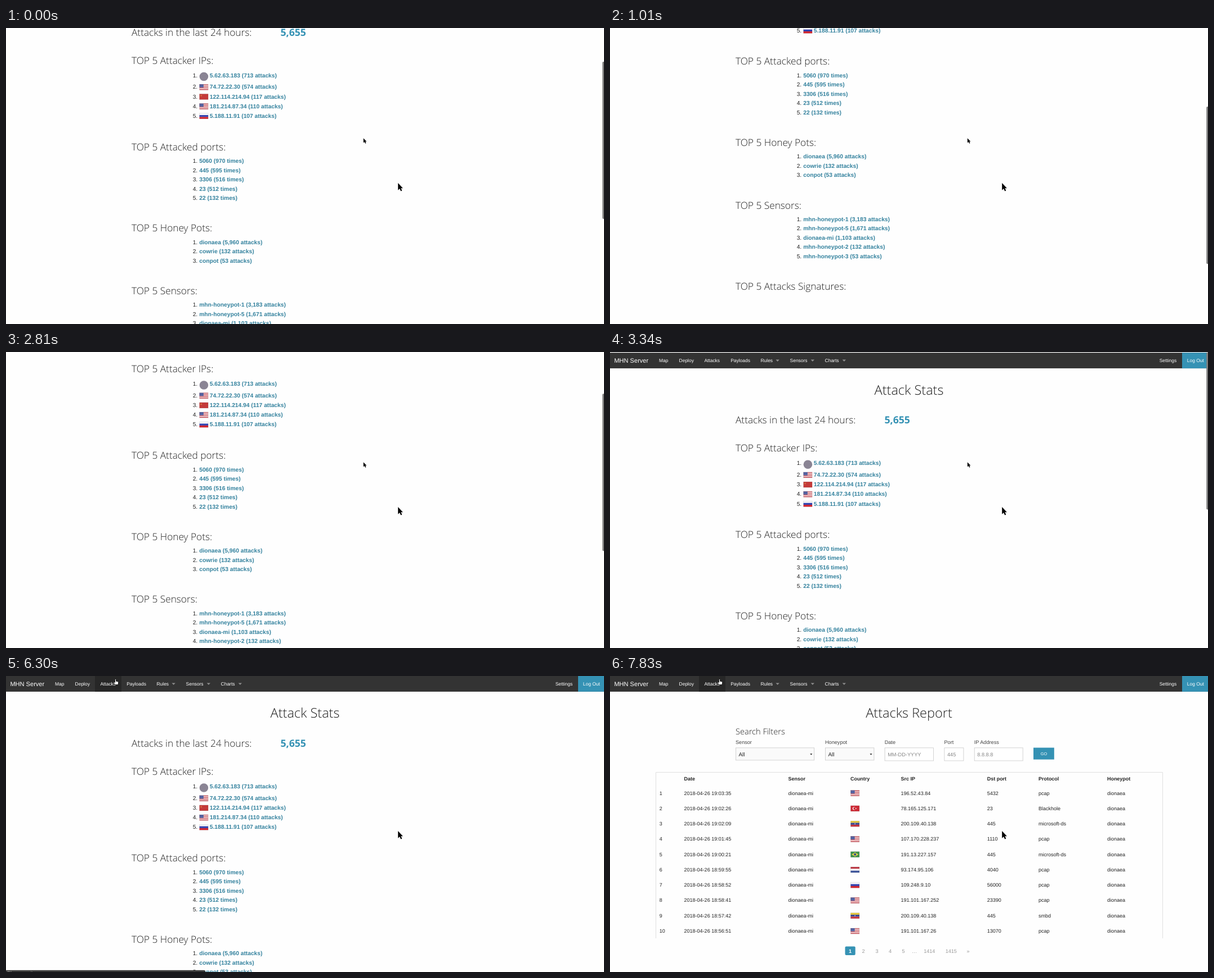
Write an HTML page that moves like this. It is 1062 by 527 pixels and loops after 8 s.

```html
<!DOCTYPE html>
<html lang="en">
<head>
<meta charset="utf-8">
<title>Attack stats</title>
<style>
html, body { margin: 0; width: 100%; height: 100%; overflow: hidden; background: #fefefe; }
svg { display: block; width: 100%; height: 100%; }
text { font-family: "Liberation Sans", Arial, sans-serif; text-rendering: geometricPrecision; white-space: pre; }
.head { font-family: "Open Sans", sans-serif; font-weight: 300; }
.total { font-family: "Open Sans", sans-serif; font-weight: 700; }
</style>
</head>
<body>
<svg id="stage" viewBox="0 0 1062 527" xmlns="http://www.w3.org/2000/svg"></svg>
<script>
const LOOP = 8000;
const BLUE = '#3592b4', LINK = '#34829e', INK = '#222';
const TITLE = 23.5, SECTION = 17.25, SUBHEAD = 14.6;

// Runs of picture changes: first time, last time, count
const RUNS = [
  [0, 0, 1], [150, 1190, 7], [1360, 1510, 2], [1840, 1980, 2], [2340, 2490, 2],
  [2660, 3340, 5], [3550, 4570, 6], [4750, 5380, 4], [5650, 6500, 5], [6770, 7660, 5], [7830, 7830, 1]
];
const STEPS = RUNS.flatMap(([a, b, n]) =>
  Array.from({ length: n }, (_, i) => n > 1 ? Math.floor((a + (b - a) * i / (n - 1)) / 10) * 10 : a));
const SCROLL_UP = [[2340, 283], [2490, 240], [2660, 140], [2830, 35], [3000, -12], [3170, -4], [3340, -1.2], [3550, 0]];

// Markup helpers
const text = (x, y, str, size, fill = INK, extra = '') =>
  `<text x="${x}" y="${y}" font-size="${size}" fill="${fill}" ${extra}>${str}</text>`;
const rect = (x, y, w, h, fill, extra = '') =>
  `<rect x="${x}" y="${y}" width="${w}" height="${h}" fill="${fill}" ${extra}/>`;
const group = (id, body, extra = '') => `<g id="${id}" ${extra}>${body}</g>`;
const BOLD = 'font-weight="700"', MID = 'text-anchor="middle"';
const heading = (x, y, str, size, extra = '') => text(x, y, str, size, INK, 'class="head" ' + extra);
const disc = (cx, cy, r, fill) => `<circle cx="${cx}" cy="${cy}" r="${r}" fill="${fill}"/>`;

// Flags, 15.5 by 10
const bands = colors => colors.map((c, i) =>
  rect(0, i * 10 / colors.length, 15.5, 10 / colors.length + 0.05, c)).join('');
const FLAGS = {
  us: bands(['#c8474f', '#f3e6e8', '#c8474f', '#f3e6e8', '#c8474f', '#f3e6e8', '#c8474f']) + rect(0, 0, 7.2, 5.6, '#5462a0'),
  cn: rect(0, 0, 15.5, 10, '#c43a3a') + disc(3, 3, 1.2, '#d9843f'),
  ru: bands(['#f6f6f8', '#3142b0', '#d0242e']),
  tr: rect(0, 0, 15.5, 10, '#cd2a35') + disc(6, 5, 2.6, '#fff') + disc(6.8, 5, 2.1, '#cd2a35') + disc(9.4, 5, 0.9, '#fff'),
  ve: bands(['#e3c53c', '#34458f', '#c4333d']) + disc(7.7, 5, 0.9, '#c9cfe4'),
  br: rect(0, 0, 15.5, 10, '#3b8f4b') + '<path d="M1.6 5 7.75 1.2 13.9 5 7.75 8.8Z" fill="#dfcf45"/>' + disc(7.75, 5, 2.1, '#35508f'),
  nl: bands(['#bd3a45', '#f5f5f7', '#3d559b'])
};
const flag = (code, x, cy) => `<g transform="translate(${x} ${cy - 5})">${FLAGS[code]}` +
  '<rect width="15.5" height="10" fill="none" stroke="#000" stroke-opacity=".15" stroke-width=".6"/></g>';

function navBar() {
  const item = (x, str) => text(x, 16.8, str, 8.45, '#fff');
  const arrow = x => `<path d="M${x - 3.2} 12.4h6.4l-3.2 3.4z" fill="#8f8f8f"/>`;
  return rect(0, 0, 1062, 27.9, '#333') +
    rect(158, 0, 47, 27.9, '#272727', 'id="hover"') +
    rect(1016, 0, 46, 27.9, BLUE) +
    text(7.4, 17.8, 'MHN Server', 11.05, '#fff') +
    [[87, 'Map'], [122.6, 'Deploy'], [167.4, 'Attacks'], [214.2, 'Payloads'], [267.5, 'Rules'],
     [319.6, 'Sensors'], [381.6, 'Charts'], [975.7, 'Settings'], [1024.8, 'Log Out']].map(a => item(...a)).join('') +
    [297.6, 359.8, 415.8].map(arrow).join('');
}

function numbered(y, lines) {
  return lines.map((str, i) => {
    const row = y + i * 16.5;
    return text(331.7, row, `${i + 1}.`, 10.2) + text(343.2, row, str, 10.25, LINK, BOLD);
  }).join('');
}

function statsPage() {
  const ips = [['', '5.62.63.183 (713'], ['us', '74.72.22.30 (574'], ['cn', '122.114.214.94 (117'],
    ['us', '181.214.87.34 (110'], ['ru', '5.188.11.91 (107']];
  const ipRows = ips.map(([code, str], i) => {
    const y = i ? 203.8 + i * 17.15 : 200.2;
    return text(331.7, y, `${i + 1}.`, 10.2) +
      (code ? flag(code, 343.6, y - 3.2) : disc(351.4, 199, 7.8, '#8a8494')) +
      text(361.8, y, str + ' attacks)', 10.25, LINK, BOLD);
  }).join('');
  return heading(531, 74.4, 'Attack Stats', TITLE, MID) +
    heading(223, 126, 'Attacks in the last 24 hours:', SECTION) +
    text(487.5, 126, '5,655', 17.6, BLUE, 'class="total"') +
    [[176, 'Attacker IPs'], [330.3, 'Attacked ports'], [474.9, 'Honey Pots'], [586.4, 'Sensors'], [731.2, 'Attacks Signatures']]
      .map(([y, str]) => heading(223, y, `TOP 5 ${str}:`, SECTION)).join('') +
    ipRows +
    numbered(352.6, ['5060 (970', '445 (595', '3306 (516', '23 (512', '22 (132'].map(s => s + ' times)')) +
    numbered(497.1, ['dionaea (5,960', 'cowrie (132', 'conpot (53'].map(s => s + ' attacks)')) +
    numbered(608.6, ['mhn-honeypot-1 (3,183', 'mhn-honeypot-5 (1,671', 'dionaea-mi (1,103',
      'mhn-honeypot-2 (132', 'mhn-honeypot-3 (53'].map(s => s + ' attacks)'));
}

function reportPage() {
  const field = (x, w, label, value, select) =>
    text(x, 121.4, label, 9.15, '#444') +
    rect(x + 0.4, 127.9, w, select ? 22 : 23, select ? '#fafafa' : '#fff', 'stroke="#c8c8c8" stroke-width=".8"') +
    text(x + 5.5, select ? 142.6 : 143, value, select ? 9.8 : 9.2, select ? INK : '#858585') +
    (select ? `<path d="M${x + w - 7} 138.2h4l-2 2.6z" fill="#222"/>` : '');
  const cols = [87.8, 131.6, 316.6, 427, 516.6, 669.8, 761, 883];
  const heads = ['', 'Date', 'Sensor', 'Country', 'Src IP', 'Dst port', 'Protocol', 'Honeypot'];
  const rows = `19:03:35 us 196.52.43.84 5432 pcap
19:02:26 tr 78.165.125.171 23 Blackhole
19:02:09 ve 200.109.40.138 445 microsoft-ds
19:01:45 us 107.170.228.237 1110 pcap
19:00:21 br 191.13.227.157 445 microsoft-ds
18:59:55 nl 93.174.95.106 4040 pcap
18:58:52 ru 109.248.9.10 56000 pcap
18:58:41 us 191.101.167.252 23390 pcap
18:57:42 ve 200.109.40.138 445 smbd
18:56:51 us 191.101.167.26 13070 pcap`.split('\n').map((line, i) => {
    const [time, code, ip, port, protocol] = line.split(' ');
    const y = 211.5 + i * 27.27;
    return [i + 1, '2018-04-26 ' + time, 'dionaea-mi', '', ip, port, protocol, 'dionaea']
      .map((s, c) => text(cols[c], y, s, 9)).join('') + flag(code, 427.4, y - 2.9);
  }).join('');
  const pages = [[450, '2'], [474, '3'], [497.5, '4'], [521, '5'], [540.5, '…'], [567.3, '1414'], [605.8, '1415'], [636, '»']];
  return heading(531, 74.4, 'Attacks Report', TITLE, MID) +
    heading(223, 104.2, 'Search Filters', SUBHEAD) +
    field(223, 139.3, 'Sensor', 'All', true) + field(382, 86.5, 'Honeypot', 'All', true) +
    field(487.7, 86.5, 'Date', 'MM-DD-YYYY') + field(593.5, 34, 'Port', '445') + field(646.8, 86, 'IP Address', '8.8.8.8') +
    rect(752, 127.6, 36.8, 21, BLUE) + text(770.4, 140.6, 'GO', 7.3, '#fff', MID) +
    '<path d="M81.5 467V171.5H981.5V467" fill="none" stroke="#ddd" stroke-width=".9"/>' +
    heads.map((s, c) => text(cols[c], 186.2, s, 8.95, INK, BOLD)).join('') + rows +
    rect(417.5, 481.5, 18.2, 15.6, BLUE, 'rx="2"') + text(426.6, 492.6, '1', 9.1, '#fff', MID + ' ' + BOLD) +
    pages.map(([x, s]) => text(x, 492.6, s, 9.1, '#999', MID)).join('');
}

const ARROW = '<path d="M0 0V14.2L3.3 11.2 5.6 16.3 8 15.2 5.8 10.3H9.8Z" fill="#000" stroke="#fff" stroke-width="1" stroke-linejoin="round" paint-order="stroke"/>';
const HAND = '<path d="M-1 1.2Q0-.2 1 1.2V4.2L4.6 5Q5.4 5.4 5.2 7L4.4 10.6H-.8L-3.4 6.6Q-3.2 5.2-1 6.4Z" fill="#fff" stroke="#111" stroke-width=".9" stroke-linejoin="round"/>';

const $ = id => document.getElementById(id);
$('stage').innerHTML =
  rect(0, 0, 1062, 527, '#fefefe') +
  group('page', group('stats', statsPage()) + group('report', reportPage()) + navBar()) +
  group('status', rect(-4, 523.8, 358, 10, '#3a3a3a', 'rx="2.5"') + text(2, 532, '', 9, '#bbb', 'id="message"')) +
  rect(1059.2, 0, 4, 280, '#7d7d7d', 'id="thumb" rx="1.8"') +
  group('pointer', group('arrow', ARROW, 'transform="scale(.58)"') + group('hand', HAND)) +
  `<g transform="translate(696.2 276) scale(.89)">${ARROW}</g>`;

const show = (id, on) => $(id).setAttribute('display', on ? 'inline' : 'none');
const set = (id, name, value) => $(id).setAttribute(name, value);
const clamp = v => Math.max(0, Math.min(1, v));
const lerp = (a, b, u) => a + (b - a) * u;

function along(keys, t) {
  const i = keys.findIndex(k => k[0] >= t);
  if (i < 0) return keys[keys.length - 1][1];
  if (i === 0) return keys[0][1];
  const [a, b] = [keys[i - 1], keys[i]];
  return lerp(a[1], b[1], (t - a[0]) / (b[0] - a[0]));
}

function scrollAt(t) {
  if (t >= 2340) return along(SCROLL_UP, t);
  return t >= 1510 ? 283 : 283 - 170.5 * Math.exp(-t / 451);
}

function thumbAlpha(t) {
  if (t < 1980) return t < 1840 ? 1 : 0.45;
  if (t < 2490 || t >= 4100) return 0;
  return t < 3900 ? 1 : 0.45;
}

function render(now) {
  const time = now % LOOP;
  const t = STEPS.filter(s => s <= time).pop();
  const scroll = scrollAt(t), loaded = t >= 6770;
  set('page', 'transform', `translate(0 ${-scroll})`);
  show('stats', !loaded);
  show('report', loaded);

  set('thumb', 'y', Math.max(0.5, scroll * 0.526 + 0.7));
  set('thumb', 'opacity', thumbAlpha(t));

  const u = clamp((t - 3550) / 1020), ease = u * u * (3 - 2 * u);
  const x = lerp(634.8, 194.5, ease), y = lerp(196.2, 5, ease);
  set('pointer', 'transform', `translate(${x} ${y})`);
  show('hand', y < 27);
  show('arrow', y >= 27);
  show('hover', y < 27 && x > 158 && x < 205);

  show('status', t >= 4750 && !loaded);
  $('message').textContent = t < 5650 ? 'Loading attack list…' : 'Please wait…';
}

function frame(now) {
  render(now);
  requestAnimationFrame(frame);
}
render(0);
requestAnimationFrame(frame);
</script>
</body>
</html>
```
